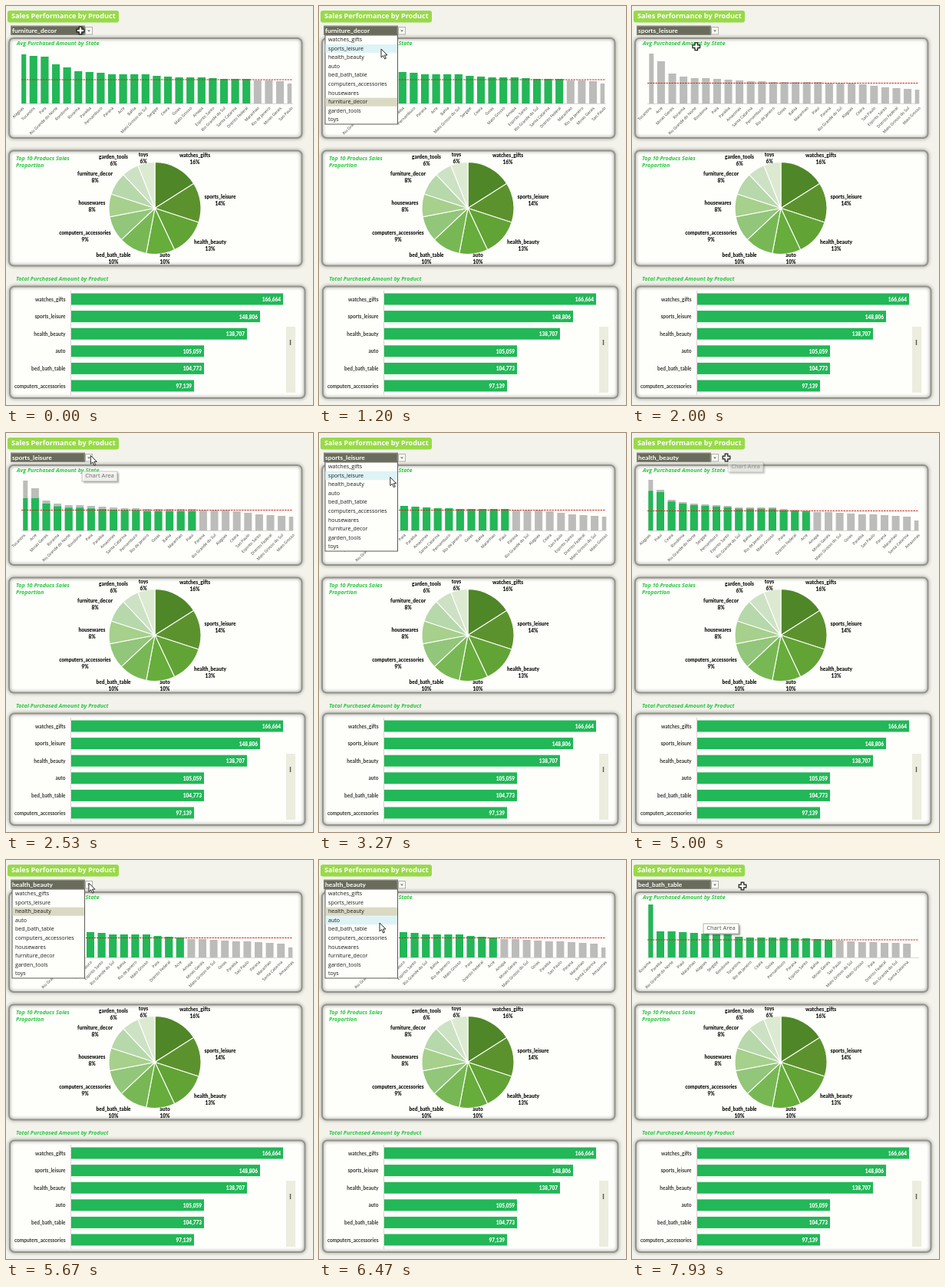
An HTML page with a canvas for the animation above (8000 ms loop, 400 by 520 pixels).

```html
<!DOCTYPE html>
<html lang="en">
<head>
<meta charset="utf-8">
<title>Sales dashboard</title>
<style>
  html, body { margin: 0; width: 100%; height: 100%; overflow: hidden; background: #f3f3ec; }
  canvas { display: block; width: 400px; height: 520px; }
</style>
</head>
<body>
<canvas id="stage"></canvas>
<script>
const LOOP = 8000, BASE = 127, PITCH = 14.6, ROW = 11.6;
const GREEN = '#22b757', GREY = '#bcbcbb';
const canvas = document.getElementById('stage');
const ctx = canvas.getContext('2d');
const ratio = window.devicePixelRatio || 1;
canvas.width = 400 * ratio;
canvas.height = 520 * ratio;

const products = ['watches_gifts', 'sports_leisure', 'health_beauty', 'auto', 'bed_bath_table',
  'computers_accessories', 'housewares', 'furniture_decor', 'garden_tools', 'toys'];

// percent, colour, label centre
const slices = [
  [16, '#4f8628', 246, 195], [14, '#5c922e', 279, 249], [13, '#62a336', 266, 308],
  [10, '#66ad3c', 207, 325], [10, '#78b854', 140, 325], [9, '#92c67a', 103, 296],
  [8, '#a6d08c', 112, 257], [8, '#b6d8ab', 116, 219], [6, '#cde2c4', 140, 197], [6, '#dcead2', 179, 194]
];

const totals = [['166,664', 361], ['148,806', 331], ['138,707', 314],
  ['105,059', 258], ['104,773', 258], ['97,139', 245]];

// One chart per selected product; "above" counts the bars over the average line.
const charts = [
  { start: -1000, product: 7, left: 21.2, line: 96, above: 21,
    states: 'Alagoas,Tocantins,Para,Rio Grande do Norte,Rondonia,Roraima,Paraiba,Pernambuco,Parana,Acre,Bahia,Mato Grosso do Sul,Sergipe,Ceara,Goias,Mato Grosso,Amapa,Espirito Santo,Rio Grande do Sul,Santa Catarina,Distrito Federal,Maranhao,Rio de Janeiro,Minas Gerais,Sao Paulo',
    heights: [64, 62, 61, 51, 47, 42, 41, 40, 38, 38, 38, 38, 36, 35, 34, 34, 34, 33, 32, 32, 32, 30, 30, 29, 26] },
  { start: 2000, product: 1, left: 23.3, line: 100.5, above: 16,
    states: 'Tocantins,Acre,Minas Gerais,Roraima,Rio Grande do Norte,Rondonia,Para,Paraiba,Amazonas,Santa Catarina,Pernambuco,Rio de Janeiro,Goias,Bahia,Maranhao,Piaui,Parana,Rio Grande do Sul,Alagoas,Ceara,Sao Paulo,Espirito Santo,Distrito Federal,Mato Grosso do Sul,Mato Grosso',
    heights: [65, 55, 39, 35, 33, 33, 32, 31, 30, 29, 29, 28, 28, 28, 28, 28, 26, 26, 26, 25, 23, 21, 20, 19, 18] },
  { start: 4150, product: 2, left: 22.4, line: 101.5, above: 15,
    states: 'Alagoas,Piaui,Ceara,Rondonia,Rio Grande do Norte,Sergipe,Pernambuco,Espirito Santo,Rio Grande do Sul,Bahia,Rio de Janeiro,Mato Grosso,Para,Distrito Federal,Acre,Amapa,Minas Gerais,Mato Grosso do Sul,Goias,Paraiba,Sao Paulo,Parana,Maranhao,Santa Catarina,Amazonas',
    heights: [66, 53, 40, 37, 35, 34, 33, 32, 30, 30, 30, 30, 28, 27, 26, 24, 24, 23, 22, 21, 21, 20, 19, 18, 13] },
  { start: 7050, product: 4, left: 22.4, line: 104, above: 17,
    states: 'Roraima,Paraiba,Rio Grande do Norte,Piaui,Maranhao,Alagoas,Sergipe,Rondonia,Tocantins,Rio de Janeiro,Ceara,Goias,Pernambuco,Parana,Espirito Santo,Bahia,Minas Gerais,Sao Paulo,Mato Grosso do Sul,Mato Grosso,Para,Distrito Federal,Rio Grande do Sul,Santa Catarina',
    heights: [69, 34, 34, 33, 32, 31, 30, 30, 27, 26, 26, 26, 26, 25, 25, 24, 23, 22, 21, 20, 20, 19, 19, 18] }
];
charts[2].start = 4350;

const menus = [[550, 1950], [2750, 4350], [5500, 7000]];

// from, to, x, y
const tips = [[2350, 2650, 99, 50], [4750, 5080, 125, 38], [7600, 8100, 93, 83]];

// time, x, y, shape
const pointer = [
  [0, 97, 32, 'cross'], [150, 97, 32, 'cross'], [350, 108, 31, 'arrow'], [650, 108, 31, 'arrow'],
  [1100, 81, 56, 'arrow'], [1950, 81, 56, 'cross'], [2150, 98, 36, 'cross'], [2300, 111, 29, 'arrow'],
  [2900, 109, 30, 'arrow'], [3500, 85, 71, 'arrow'], [4400, 85, 71, 'cross'], [4800, 123, 32, 'cross'],
  [5100, 123, 32, 'cross'], [5350, 108, 30, 'arrow'], [5650, 108, 30, 'arrow'], [6350, 79, 82, 'arrow'],
  [6600, 79, 82, 'arrow'], [6800, 81, 90, 'arrow'], [7050, 84, 88, 'cross'], [7500, 90, 70, 'cross'],
  [7800, 144, 34, 'cross'], [8000, 144, 34, 'cross']
];

const lerp = (a, b, p) => a + (b - a) * p;
const clamp = v => Math.max(0, Math.min(1, v));
const smooth = p => p * p * (3 - 2 * p);

function rect(x, y, w, h, fill) {
  ctx.fillStyle = fill;
  ctx.fillRect(x, y, w, h);
}

function text(str, x, y, font, color, align = 'left') {
  ctx.font = font + ', sans-serif';
  ctx.fillStyle = color;
  ctx.textAlign = align;
  ctx.textBaseline = 'middle';
  ctx.fillText(str, x, y);
}

function line(x1, y1, x2, y2, color, width = 1, dash = []) {
  ctx.strokeStyle = color;
  ctx.lineWidth = width;
  ctx.setLineDash(dash);
  ctx.beginPath();
  ctx.moveTo(x1, y1);
  ctx.lineTo(x2, y2);
  ctx.stroke();
  ctx.setLineDash([]);
}

function rounded(x, y, w, h, r, fill) {
  ctx.beginPath();
  ctx.roundRect(x, y, w, h, r);
  ctx.fillStyle = fill;
  ctx.fill();
}

function panel(x, y, w, h) {
  rounded(x, y, w, h, 6, '#fefefb');
  ctx.save();
  ctx.shadowColor = '#777772';
  ctx.shadowBlur = 4 * ratio;
  ctx.strokeStyle = '#94948c';
  ctx.lineWidth = 2;
  ctx.stroke();
  ctx.restore();
}

function heading(str, x, y) {
  text(str, x, y, 'italic bold 7.2px "Open Sans"', '#26c63c');
}

function drawStateChart(chart, t) {
  const p = clamp((t - chart.start) / 820);
  ctx.save();
  ctx.beginPath();
  ctx.rect(chart.left - 1, 50, 352, 78);
  ctx.clip();
  chart.heights.forEach((h, i) => {
    const x = chart.left + i * PITCH - 5;
    rect(x, BASE - h, 10, h, GREY);
    if (i < chart.above) {
      const green = p < 1 ? Math.min(65 * p, h * p ** 0.25) : h;
      rect(x, BASE - green, 10, green, GREEN);
    }
  });
  ctx.restore();
  line(20, BASE + 0.5, 374, BASE + 0.5, '#d8d8d4');
  line(20, chart.line, 373, chart.line, '#c42d22', 1, [2.5, 1]);
  chart.states.split(',').forEach((name, i) => {
    ctx.save();
    ctx.translate(chart.left + i * PITCH + 1.5, 132.5);
    ctx.rotate(-Math.PI / 4);
    text(name, 0, 0, '5.1px "Open Sans"', '#3a3a36', 'right');
    ctx.restore();
  });
}

function drawPie() {
  let angle = -Math.PI / 2;
  slices.forEach(([percent, color]) => {
    const end = angle + percent / 100 * Math.PI * 2;
    ctx.beginPath();
    ctx.moveTo(194, 263.5);
    ctx.arc(194, 263.5, 60, angle, end);
    ctx.closePath();
    ctx.fillStyle = color;
    ctx.fill();
    ctx.strokeStyle = '#fefefb';
    ctx.lineWidth = 1.1;
    ctx.stroke();
    angle = end;
  });
  slices.forEach(([percent, , x, y], i) => {
    text(products[i], x, y, '900 6.5px Lato', '#151512', 'center');
    text(percent + '%', x, y + 9, '900 6.5px Lato', '#151512', 'center');
  });
}

function drawTotals() {
  line(84.5, 371, 84.5, 507, '#d5d5d0');
  totals.forEach(([value, end], i) => {
    const y = 382 + i * 22.6;
    rect(85, y - 7.5, end - 85, 15, GREEN);
    text(products[i], 77.5, y + 0.7, 'bold 6.5px Lato', '#33332e', 'right');
    text(value, end - 3, y + 1, '900 6.5px Lato', '#fff', 'right');
  });
  rect(365, 418, 12, 86, '#ededdf');
  line(370.5, 435, 370.5, 442, '#62625c', 1.5);
}

function drawCombo(product) {
  rect(6, 25.5, 97, 12.5, '#83897a');
  rect(7.5, 27, 94, 10, '#6a6b5a');
  text(products[product], 8, 32, 'bold 8.4px Lato', '#fff');
  rect(103, 27, 10, 10.5, '#b2b2a9');
  rect(104, 28, 8, 8.5, '#f8f8f4');
  ctx.beginPath();
  ctx.moveTo(106, 31.5);
  ctx.lineTo(110, 31.5);
  ctx.lineTo(108, 33.7);
  ctx.fillStyle = '#777770';
  ctx.fill();
}

function drawMenu(selected, hover, pressed) {
  rect(7.5, 37.5, 95.5, 117, '#5c5c54');
  rect(8.5, 38.5, 93.5, 115, '#fefefb');
  products.forEach((name, i) => {
    const y = 38.5 + i * ROW;
    if (i === selected && !pressed) rect(8.5, y, 93.5, 11, '#dad9c4');
    if (i === hover) rect(8.5, y, 93.5, 11, pressed ? '#b8dcf2' : '#def3f6');
    text(name, 12, y + 5.6, '7.1px "Open Sans"', '#1c1c1a');
  });
}

function drawTip(x, y) {
  ctx.save();
  ctx.shadowColor = 'rgba(60,60,55,.5)';
  ctx.shadowBlur = 2 * ratio;
  ctx.shadowOffsetX = ctx.shadowOffsetY = 1.5 * ratio;
  rect(x, y, 46, 13, '#fefefa');
  ctx.restore();
  ctx.strokeStyle = '#a0a098';
  ctx.lineWidth = 0.8;
  ctx.strokeRect(x, y, 46, 13);
  text('Chart Area', x + 23, y + 6.5, '7.6px "Open Sans"', '#505050', 'center');
}

function drawPointer(x, y, shape) {
  const points = shape === 'arrow'
    ? [[0, 0], [0, 11], [2.6, 8.6], [4.6, 13], [6.4, 12.2], [4.5, 8], [8, 8]]
    : [[-1.8, -4.8], [1.8, -4.8], [1.8, -1.8], [4.8, -1.8], [4.8, 1.8], [1.8, 1.8],
       [1.8, 4.8], [-1.8, 4.8], [-1.8, 1.8], [-4.8, 1.8], [-4.8, -1.8], [-1.8, -1.8]];
  ctx.beginPath();
  points.forEach(([dx, dy]) => ctx.lineTo(x + dx, y + dy));
  ctx.closePath();
  ctx.fillStyle = '#fff';
  ctx.fill();
  ctx.strokeStyle = '#181816';
  ctx.lineWidth = shape === 'arrow' ? 0.9 : 1.2;
  ctx.stroke();
}

function pointerAt(t) {
  const i = pointer.findLastIndex(key => key[0] <= t);
  const [t0, x0, y0, shape] = pointer[i];
  const [t1, x1, y1] = pointer[i + 1];
  const p = smooth((t - t0) / (t1 - t0));
  return { x: lerp(x0, x1, p), y: lerp(y0, y1, p), shape };
}

function draw(t) {
  ctx.setTransform(ratio, 0, 0, ratio, 0, 0);
  rect(0, 0, 400, 520, '#f3f3ec');

  rounded(2, 6, 145, 15.5, 3, '#98da48');
  text('Sales Performance by Product', 7, 14, 'bold 9.1px "Open Sans"', '#fff');

  panel(4, 42, 381.5, 130);
  panel(4, 188.5, 381.5, 150);
  panel(5, 365.5, 384.5, 145.5);
  heading('Avg Purchased Amount by State', 14, 49.5);
  heading('Top 10 Producs Sales', 13, 199);
  heading('Proportion', 13, 208);
  heading('Total Purchased Amount by Product', 13, 356);

  const chart = charts.findLast(c => c.start <= t);
  drawStateChart(chart, t);
  drawPie();
  drawTotals();
  drawCombo(chart.product);

  const hand = pointerAt(t);
  const menu = menus.find(([from, to]) => t >= from && t < to);
  if (menu) {
    const hover = hand.y > 38 ? Math.floor((hand.y - 38) / ROW) : -1;
    drawMenu(chart.product, hover, menu[1] - t < 200);
  }
  tips.forEach(([from, to, x, y]) => {
    if (t < from || t >= to) return;
    ctx.globalAlpha = clamp((to - t) / 150);
    drawTip(x, y);
    ctx.globalAlpha = 1;
  });
  drawPointer(hand.x, hand.y, hand.shape);
}

function frame() {
  draw(performance.now() % LOOP);
  requestAnimationFrame(frame);
}
frame();
</script>
</body>
</html>
```
